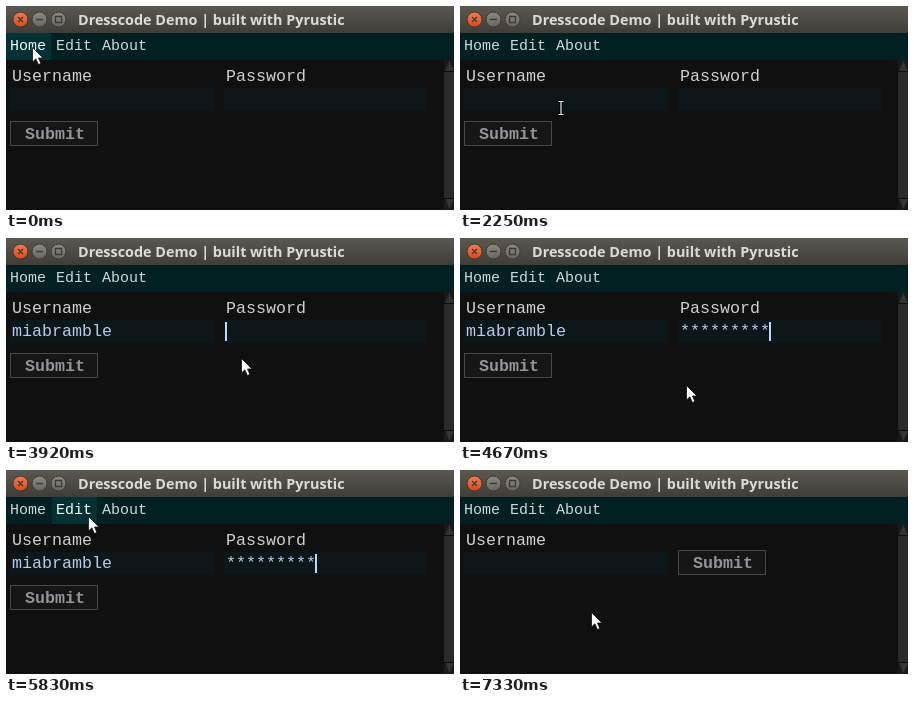
Animation of 448 by 204 pixels, one loop 8 s. Source, as an HTML page:

```html
<!DOCTYPE html>
<html lang="en">
<head>
<meta charset="utf-8">
<title>Form demo</title>
<style>
  html, body { margin: 0; width: 100%; height: 100%; overflow: hidden; background: #101010; }
  svg { display: block; width: 100%; height: 100%; }
  text { white-space: pre; font: 16.667px "Liberation Mono", monospace; fill: #d0d0d0; }
  .title { font: bold 14.38px "Open Sans", sans-serif; fill: #dfdbd2; }
  .menu text { font-size: 15px; fill: #cdd9d9; }
  .menu rect { fill: none; }
  .menu .on text { fill: #f4fbfb; }
  .menu .on rect { fill: #023134; }
  .entry { fill: #0d1719; }
  .typed { fill: #b9cbec; }
  .submit text { font-weight: bold; fill: #969398; }
  .submit rect { fill: #161617; stroke: #484848; }
</style>
</head>
<body>
<svg viewBox="0 0 448 204">
  <defs>
    <linearGradient id="bar" x2="0" y2="1">
      <stop stop-color="#5b5951"/><stop offset="1" stop-color="#3e3d38"/>
    </linearGradient>
    <linearGradient id="red" x2="0" y2="1">
      <stop stop-color="#f47a50"/><stop offset="1" stop-color="#dd4a1c"/>
    </linearGradient>
    <linearGradient id="grey" x2="0" y2="1">
      <stop stop-color="#8d8a80"/><stop offset="1" stop-color="#69665e"/>
    </linearGradient>
  </defs>
  <rect width="448" height="204" fill="#101010"/>

  <rect width="448" height="27" fill="url(#bar)"/>
  <g stroke="#3a3934">
    <circle cx="14.5" cy="13.5" r="7.5" fill="url(#red)"/>
    <circle cx="33.5" cy="13.5" r="7.5" fill="url(#grey)"/>
    <circle cx="52.5" cy="13.5" r="7.5" fill="url(#grey)"/>
    <path d="M12 11l5 5m0-5l-5 5M30 13.5h7M49.5 10.5h6v6h-6z" fill="none" stroke-width="1.3"/>
  </g>
  <text class="title" x="72" y="19">Dresscode Demo | built with Pyrustic</text>

  <rect y="27" width="448" height="27" fill="#012022"/>
  <g class="menu">
    <g><rect x="0" y="27" width="45" height="27"/><text x="4" y="44">Home</text></g>
    <g><rect x="46" y="27" width="45" height="27"/><text x="50" y="44">Edit</text></g>
    <g><rect x="92" y="27" width="53" height="27"/><text x="96" y="44">About</text></g>
  </g>

  <text x="6" y="75">Username</text>
  <rect class="entry" x="4" y="82" width="204" height="23"/>
  <text class="typed" id="user" x="6" y="98"></text>
  <g id="login">
    <text x="220" y="75">Password</text>
    <rect class="entry" x="218" y="82" width="203" height="23"/>
    <text class="typed" id="pass" x="220" y="98"></text>
  </g>
  <g class="submit" id="submit">
    <rect x=".5" y=".5" width="87" height="24"/>
    <text x="15" y="18">Submit</text>
  </g>
  <rect id="caret" y="84" width="2" height="19" fill="#c3d6f5"/>

  <rect x="438" y="54" width="10" height="150" fill="#191919"/>
  <rect x="438" y="66" width="10" height="126" fill="#2b2b2b"/>
  <path d="M439 65l4.5-10 4.5 10zM439 193l4.5 10 4.5-10z" fill="#343434"/>
  <path d="M438 65.5h10M438 192.5h10" stroke="#0a0a0a"/>

  <path id="arrow" d="M.5 .5v14.5l3.4-3.2 2.4 5.7 2.6-1.1-2.4-5.4H11z" fill="#fff" stroke="#111" stroke-width=".8"/>
  <g id="beam" fill="none">
    <path d="M-2.5-6.5H2.5M0-6.5V6.5M-2.5 6.5H2.5" stroke="#000" stroke-width="3"/>
    <path d="M-2.5-6.5H2.5M0-6.5V6.5M-2.5 6.5H2.5" stroke="#eee" stroke-width="1.2"/>
  </g>
</svg>
<script>
const $ = id => document.getElementById(id);
const LOOP = 8000, TICK = 1000 / 12;
const NAME = "miabramble", STARS = "*".repeat(9);

// Ticks at which the form changes
const FOCUS_USER = 18, TYPE_USER = 27, FOCUS_PASS = 43, TYPE_PASS = 51, EDIT_PAGE = 77;

// Pointer moves: first tick, last tick, destination x, y
const moves = [
  [6, 14, 63, 93], [24, 27, 101, 102], [34, 39, 252, 104], [39, 42, 244, 93],
  [44, 50, 226, 147], [63, 70, 82, 46], [78, 88, 131, 142]
];
const items = document.querySelectorAll(".menu g");

const clamp = (v, a, b) => Math.max(a, Math.min(b, v));
const within = (v, a, b) => v >= a && v < b;
const typed = (text, ticks, rate) => text.slice(0, clamp(ticks * rate, 0, text.length));
const show = (el, on) => el.setAttribute("visibility", on ? "visible" : "hidden");
const place = (el, x, y) => el.setAttribute("transform", `translate(${x} ${y})`);

function pointer(k) {
  let x = 26, y = 41;
  for (const [from, to, toX, toY] of moves) {
    const u = clamp((k - from) / (to - from), 0, 1), ease = u * u * (3 - 2 * u);
    x += (toX - x) * ease;
    y += (toY - y) * ease;
  }
  return [Math.round(x), Math.round(y)];
}

function draw(ms) {
  const k = Math.floor((ms + 4) / TICK);
  const [x, y] = pointer(k);
  const edit = k >= EDIT_PAGE;

  for (const item of items) {
    const { x: left, width } = item.firstChild.getBBox();
    item.classList.toggle("on", within(y, 27, 54) && within(x, left, left + width));
  }

  const inEntry = within(y, 82, 104) && (within(x, 4, 208) || !edit && within(x, 218, 421));
  show($("beam"), inEntry);
  show($("arrow"), !inEntry);
  place($("beam"), x, y);
  place($("arrow"), x, y);

  const user = edit ? "" : typed(NAME, k - TYPE_USER, 5);
  const pass = typed(STARS, k - TYPE_PASS, 2);
  $("user").textContent = user;
  $("pass").textContent = pass;
  show($("login"), !edit);
  place($("submit"), edit ? 218 : 4, edit ? 80 : 115);

  // The caret blinks from the moment a field gets focus
  const inPass = k >= FOCUS_PASS;
  const age = k - (inPass ? FOCUS_PASS : FOCUS_USER);
  show($("caret"), !edit && age >= 0 && age % 11 < 7);
  $("caret").setAttribute("x", inPass ? 219 + 10 * pass.length : 5 + 10 * user.length);
}

const start = performance.now();
function loop() {
  draw((performance.now() - start) % LOOP);
  requestAnimationFrame(loop);
}
loop();
</script>
</body>
</html>
```
